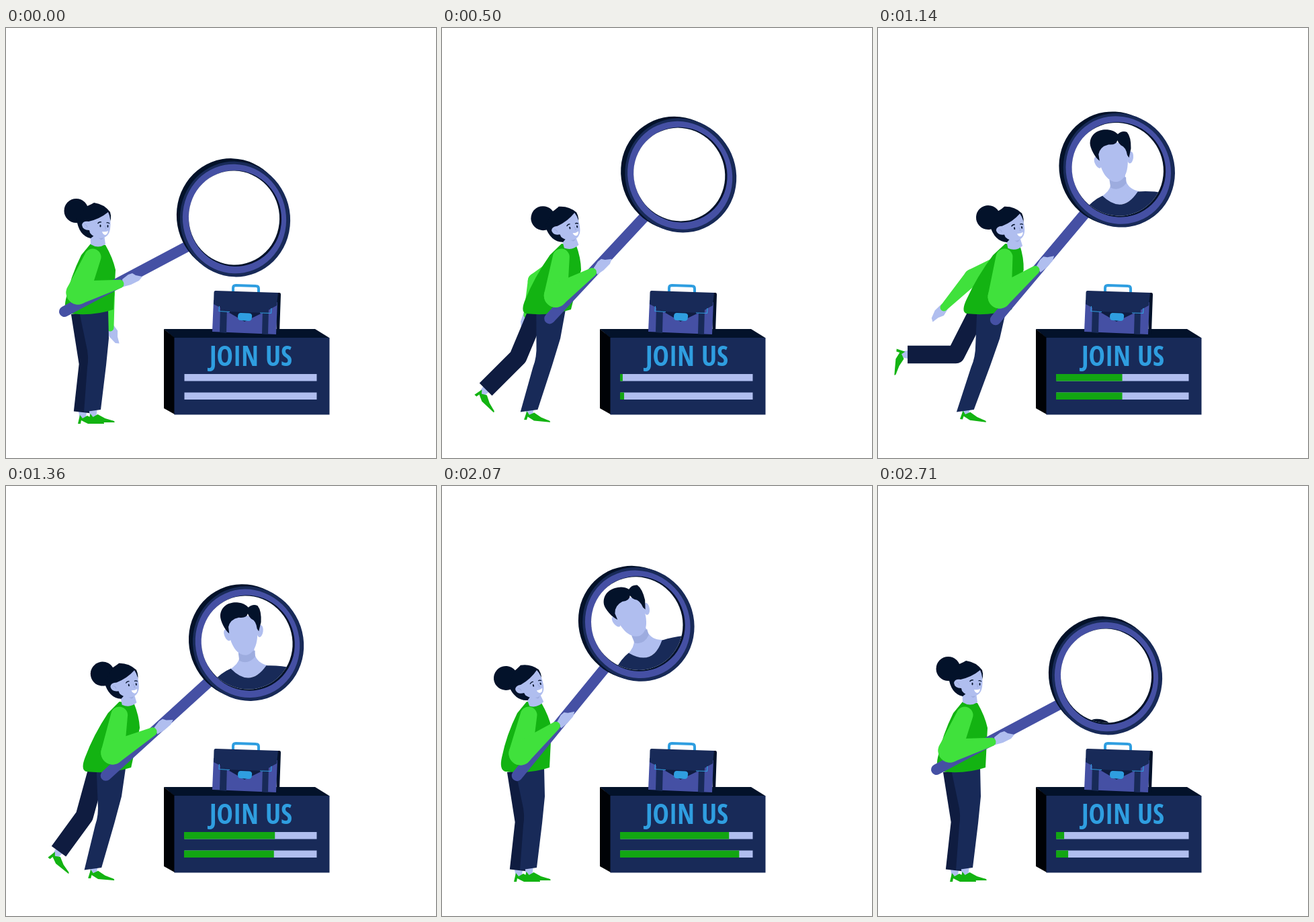
These frames come from a looping animation (640 px wide and 640 px high, 2.78 s). An HTML page with a canvas:

```html
<!DOCTYPE html>
<html lang="en">
<head>
<meta charset="utf-8">
<title>Join us</title>
<style>
  html, body { margin: 0; width: 100%; height: 100%; overflow: hidden; background: #fff; }
  canvas { display: block; }
</style>
</head>
<body>
<canvas id="stage" width="640" height="640"></canvas>
<script>
const ctx = document.getElementById('stage').getContext('2d');
const LOOP = 2780, STEPS = 39, RAD = Math.PI / 180;
const NAVY = '#182a58', NIGHT = '#0f1c40', INK = '#03122a', VIOLET = '#4550a4', SKIN = '#b0beef',
      SHADE = '#9dacdf', GREEN = '#13b312', LIME = '#40e13c', BLUE = '#2f9ee0';

// Body poses: lean, glass butt x y and turn, elbow x y, wrist x y, head x y and turn
const low  = [0, 85, 422, 0, 107, 394, 174, 380, 0, 0, 0];
const mid  = [.5, 131, 429, -11, 146, 396, 211, 369, 35, 1, -8.5];
const near = [.9, 165, 434, -21, 175, 399, 233, 361, 60, 4, -13];
const high = [1, 173, 435, -23, 182, 400, 239, 359, 67, 5, -14];
const peak = [1.04, 176, 435, -24, 184, 401, 241, 358, 69, 5, -12];
const late = [1, 173, 435, -22, 181, 400, 239, 359.5, 66.6, 4, -9.5];
const fall = [.8, 158, 433, -17, 168, 398, 231, 362, 54, 3, -9];
const lift = [0, 110, 432, -23, 117, 398, 174.5, 356, 2.5, 2.5, -17];
const top_ = [0, 116, 434, -29.5, 121, 400, 174, 350, 3, 3.5, -20];
const body = [[0, low], [290, mid], [570, near], [710, high], [920, peak], [1140, late], [1300, fall],
  [1420, mid], [1710, low], [1785, low], [2070, lift], [2215, top_], [2360, lift], [2640, low]]
  .map(([t, pose]) => [t, ...pose]);

// Knee x y, ankle x y, shoe turn
const backLeg = [[0, 122, 500, 114, 572, 0], [290, 117, 493, 88, 557, 24], [570, 112, 489, 58, 530, 50],
  [710, 110, 487, 47, 510, 66], [920, 104, 482, 31, 487, 92], [1140, 116, 486, 44, 486, 95],
  [1420, 117, 493, 88, 557, 24], [1710, 122, 500, 114, 572, 0]];
// Elbow x y, wrist x y, hand turn
const backArm = [[0, 150, 395, 155, 446, -26], [290, 145, 395, 140, 425, 0], [570, 139, 372, 122, 428, 20],
  [710, 139, 370, 111, 430, 31], [1140, 140, 371, 98, 416, 42], [1420, 145, 395, 140, 425, 0],
  [1710, 135, 385, 128, 420, 0]];
// Drop below the lens, turn against the lens
const visitor = [[0, 145, 19], [430, 145, 19], [710, 65, 19], [1140, 0, 13], [1710, 0, 0], [2080, 0, 0],
  [2140, 12, 0], [2710, 126, 0], [2780, 140, 0]];
const progress = [[0, 0, 0], [430, 0, 0], [710, .19, .26], [1140, .5, .5], [1710, .9, .9], [2000, .9, .9],
  [2070, .82, .9], [2140, .735, .825], [2710, .06, .09], [2780, 0, 0]];

// Monotone cubic interpolation of all values of a track
function sample(keys, t) {
  const n = keys.findIndex(key => key[0] > t);
  if (n < 0) return keys[keys.length - 1].slice(1);
  const i = n - 1, span = keys[n][0] - keys[i][0], u = (t - keys[i][0]) / span;
  const secant = (j, c) => (keys[j + 1][c] - keys[j][c]) / (keys[j + 1][0] - keys[j][0]);
  const slope = (j, c) => {
    if (j === 0 || j === keys.length - 1) return 0;
    const a = secant(j - 1, c), b = secant(j, c);
    return a * b > 0 ? 2 * a * b / (a + b) : 0;
  };
  return keys[i].slice(1).map((v, k) => {
    const c = k + 1, w = keys[n][c];
    return v + (w - v) * u * u * (3 - 2 * u)
      + span * u * (1 - u) * (slope(i, c) * (1 - u) - slope(n, c) * u);
  });
}

function fill(color, d) {
  ctx.fillStyle = color;
  ctx.fill(new Path2D(d));
}
function stroke(color, width, d, cap = 'butt') {
  Object.assign(ctx, { strokeStyle: color, lineWidth: width, lineCap: cap, lineJoin: 'round' });
  ctx.stroke(new Path2D(d));
}
function ellipse(color, x, y, rx, ry, turn = 0) {
  ctx.fillStyle = color;
  ctx.beginPath();
  ctx.ellipse(x, y, rx, ry, turn * RAD, 0, 7);
  ctx.fill();
}
function limb(color, ax, ay, ar, bx, by, br) {
  const a = Math.atan2(by - ay, bx - ax), q = Math.PI / 2;
  ctx.fillStyle = color;
  ctx.beginPath();
  ctx.arc(ax, ay, ar, a + q, a + 3 * q);
  ctx.arc(bx, by, br, a - q, a + q);
  ctx.fill();
}
// Draws with the point (px, py) moved to (x, y) and turned there
function at(x, y, turn, draw, px = 0, py = 0) {
  ctx.save();
  ctx.translate(x, y);
  ctx.rotate(turn * RAD);
  ctx.translate(-px, -py);
  draw();
  ctx.restore();
}
function skewed(k, draw) {
  ctx.save();
  ctx.transform(1, 0, -k, 1, k * 575, 0);
  draw();
  ctx.restore();
}

function board(bars) {
  fill(INK, 'M235 448H460L481 461H250Z');
  fill('#000206', 'M235 448L251 461V575L235 566Z');
  fill(NAVY, 'M250.500 461H481.500V575.500H250.500Z');
  ctx.fillStyle = BLUE;
  ctx.textAlign = 'center';
  ctx.font = '400 condensed 41px "Open Sans Condensed", "Open Sans", sans-serif';
  ctx.fillText('JOIN US', 364.5, 503);
  bars.forEach((part, i) => {
    const y = 515 + i * 27.5;
    ctx.fillStyle = SKIN;
    ctx.fillRect(265.500, y, 197, 10.500);
    ctx.fillStyle = '#12a612';
    ctx.fillRect(265, y, 197 * part, 10.500);
  });
}

function briefcase() {
  stroke(BLUE, 4, 'M338 393V387Q338 383 342 383L372 384Q376 384 376 388V394');
  fill(INK, 'M400 394L407 394Q409 394 409 397L407 453Q407 456 403 456Z');
  fill(VIOLET, 'M309 405L404 408L402 456L307 452Z');
  fill(NAVY, 'M319 415H329L328 454L318 453ZM382 418H391L390 456L381 455Z');
  fill(NIGHT, 'M324 419L355 437L388 421Z');
  fill(NAVY, 'M312 391L405 394L403 413L383 424L330 422L309 411L309.500 394Q309.500 391 312 391Z');
  stroke(BLUE, 1.2, 'M317.500 414L317 421.500L333 422.500M395 417L394.500 424.500L378 424');
  fill(BLUE, 'M349 424L362 424.500Q367 425 366 430Q366 436 361 436L349 435Q345 435 345 430Q345 424 349 424Z');
}

function shoe() {
  fill(SKIN, 'M-6-1H6L5 8L-4 10Z');
  fill(GREEN, 'M-4 4L-7 17H-3L-2 12L8 17H32Q33 15 28 14L18 11L7 5L0 9Z');
}

function person() {
  fill(SKIN, 'M326 285V303Q323 314 307 320Q336 350 366 320Q350 314 349 300V285Z');
  fill(SHADE, 'M325 296H350L349 305Q337 316 325 308Z');
  fill(NAVY, 'M280 336Q296 322 311 318Q336 351 364 320Q386 322 404 329V400H280Z');
  ellipse(SKIN, 312, 268, 4.5, 9, -15);
  ellipse(SKIN, 361, 268, 4.5, 9, 15);
  fill(SKIN, 'M314 252C313 288 325 300 336 301C349 300 358 285 358 252Q336 230 314 252Z');
  fill(INK, 'M315 266C309 260 304 245 305 238C308 223 322 219 334 222Q343 224 348 231Q355 226 362 230' +
    'Q367 238 364 255L359 268L357 264Q357 252 350 248Q347 245 346 240Q343 247 332 244Q319 245 315 256Z');
}

function glass([drop, turn]) {
  stroke(VIOLET, 16, 'M87 422L270 325', 'round');
  ellipse(INK, 336, 280, 82, 86, -10);
  ellipse(NAVY, 341, 284.5, 82, 86, -10);
  ellipse(VIOLET, 340, 284, 77, 81.5, -10);
  ellipse(INK, 341, 283.5, 69, 71.5, -10);
  ellipse('#fff', 339.5, 282.5, 67.5, 70, -10);
  ctx.save();
  ctx.beginPath();
  ctx.ellipse(339.5, 282.5, 67.5, 70, -10 * RAD, 0, 7);
  ctx.clip();
  at(340, 282, turn, () => { ctx.translate(0, drop); person(); }, 340, 282);
  ctx.restore();
}

function head() {
  fill(SKIN, 'M125 300H145L148 322Q137 329 126 322Z');
  fill(SHADE, 'M136 311L145 312Q144 315 141 315Z');
  ellipse(INK, 104.5, 272, 18, 18);
  fill(INK, 'M105 284L121 265Q128 262 131 260Q146 262 155 274Q158 284 153 292L126 313Q108 309 105 284Z');
  fill(SKIN, 'M152 274Q157 284 155 299Q153 312 141 313Q130 312 125 305L124 301Q114 301 113 293' +
    'Q114 287 123 288Q140 284 152 274Z');
  stroke(SHADE, 1, 'M117 292Q121 293 121 297M147 294L149 299H147');
  ellipse(INK, 140.5, 294.5, 1, 1.9);
  ellipse(INK, 151.5, 295, 1, 1.9);
  stroke(INK, 1.3, 'M136.500 291Q139 288 142 289M149.500 290Q152 289 154 291');
  fill('#fff', 'M143 303Q148 304 152 302Q151 308 147 308Q144 307 143 303Z');
}

function draw(t) {
  const [lean, gx, gy, turn, ex, ey, wx, wy, hx, hy, headTurn] = sample(body, t);
  const [kx, ky, ax, ay, shoeTurn] = sample(backLeg, t);
  const [bx, by, cx, cy, handTurn] = sample(backArm, t);
  const k = lean / 4;

  ctx.fillStyle = '#fff';
  ctx.fillRect(0, 0, 640, 640);
  board(sample(progress, t));
  briefcase();

  at(cx, cy, handTurn, () => fill(SKIN, 'M-6-2H6L8 9L4 17L2 27L-3 24L-7 12Z'));
  limb(LIME, 140 + k * 230, 345, 14, bx, by, 12);
  limb(LIME, bx, by, 12, cx, cy, 5.5);

  at(ax, ay, shoeTurn, shoe);
  stroke(NIGHT, 26.5, `M${110 + k * 150} 424L${kx} ${ky}L${ax} ${ay}`);
  at(129.5 + k * 6, 570 - lean * 4, lean * 7, shoe);

  skewed(k, () => {
    fill(NAVY, 'M109 422L152 418L153 462L149 502L141 568L116 571.500L121 505Q124 490 119 470Z');
    fill(GREEN, 'M126 321L148 323Q159 342 163 360L160 419Q130 429 94 425Q85 422 89 404Q96 370 112 338Z');
  });
  at(137 + hx, 318 + hy, headTurn, head, 137, 318);
  at(gx, gy, turn, () => glass(sample(visitor, t)), 85, 422);

  at(wx, wy, turn, () => fill(SKIN, 'M-1-6L8-13L14-15L19-12L29-10L24-4L12 2L1 5Z'));
  limb(LIME, 129 + k * 236, 341, 12.5, ex, ey, 17.5);
  limb(LIME, ex, ey, 17.5, wx - 5, wy + 1, 6.5);
}

let start;
function tick(now) {
  start ??= now;
  const step = Math.floor((now - start + 3) % LOOP / LOOP * STEPS);
  draw(step * LOOP / STEPS);
  requestAnimationFrame(tick);
}
requestAnimationFrame(tick);
</script>
</body>
</html>
```
